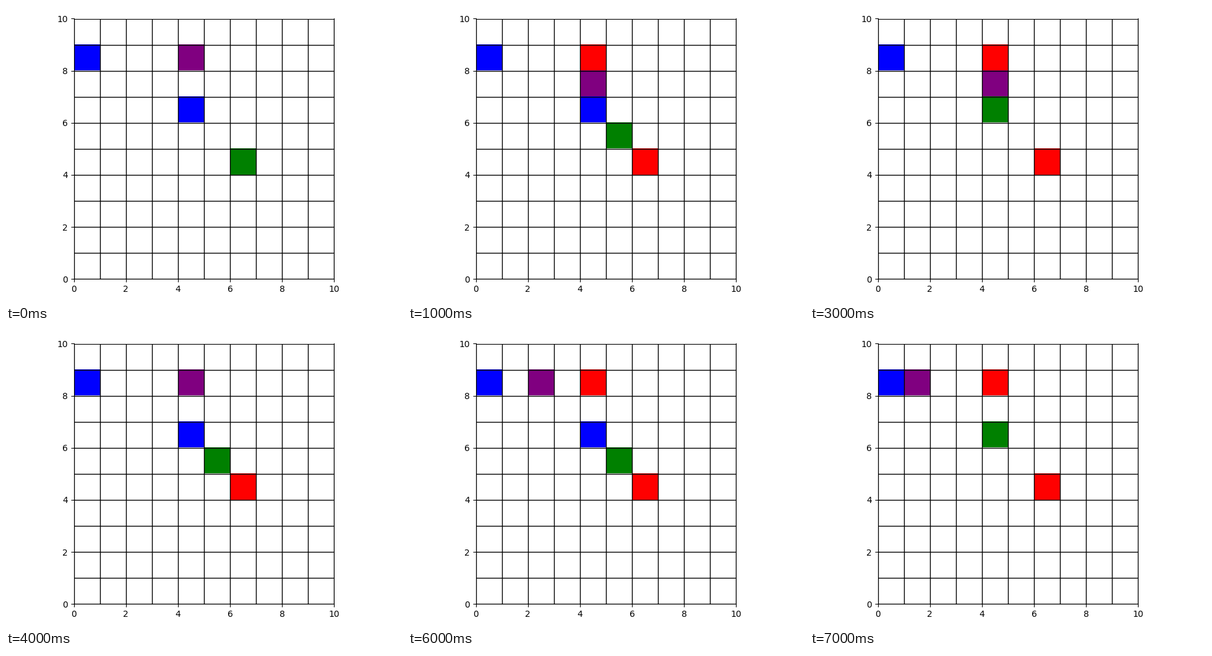
Recreate the animation shown at these times as a matplotlib script. Size 640 px wide and 480 px high, loop 8000 ms.

```python
from itertools import pairwise

import numpy as np
import matplotlib.pyplot as plt
from matplotlib.animation import FuncAnimation
from matplotlib.colors import to_rgb

SIZE = 10
STEPS = 8
PURPLE_HOME, GREEN_HOME = (4, 8), (6, 4)
FAR_GOAL, NEAR_GOAL = (0, 8), (4, 6)
WAIT = (5, 5)


def walk(*stops):
    """Cells visited one per step; a repeated stop is a one-step wait."""
    path = [stops[0]]
    for (x0, y0), (x1, y1) in pairwise(stops):
        dx, dy = x1 - x0, y1 - y0
        n = max(abs(dx), abs(dy), 1)
        path += [(x0 + dx * i // n, y0 + dy * i // n) for i in range(1, n + 1)]
    return path


purple = walk(PURPLE_HOME, NEAR_GOAL, PURPLE_HOME, FAR_GOAL)
# Green holds back for a step while purple stands on the shared goal
green = walk(GREEN_HOME, WAIT, WAIT, NEAR_GOAL, GREEN_HOME, NEAR_GOAL)


def board(step):
    grid = np.ones((SIZE, SIZE, 3))
    layers = [("red", [PURPLE_HOME, GREEN_HOME]),
              ("blue", [FAR_GOAL, NEAR_GOAL]),
              ("green", [green[step]]),
              ("purple", [purple[step]])]
    for color, cells in layers:
        for col, row in cells:
            grid[SIZE - 1 - row, col] = to_rgb(color)
    return grid


fig, ax = plt.subplots(figsize=(6.4, 4.8), dpi=100)
image = ax.imshow(board(0), origin="upper", extent=(0, SIZE, 0, SIZE),
                  interpolation="nearest")
for k in range(SIZE + 1):
    ax.axhline(k, color="black", lw=1)
    ax.axvline(k, color="black", lw=1)
ticks = range(0, SIZE + 1, 2)
ax.set(xlim=(0, SIZE), ylim=(0, SIZE), xticks=ticks, yticks=ticks)
fig.tight_layout()


def update(step):
    image.set_data(board(step))
    return [image]


anim = FuncAnimation(fig, update, frames=STEPS, interval=1000,
                     repeat=True, repeat_delay=0)
plt.show()
```
